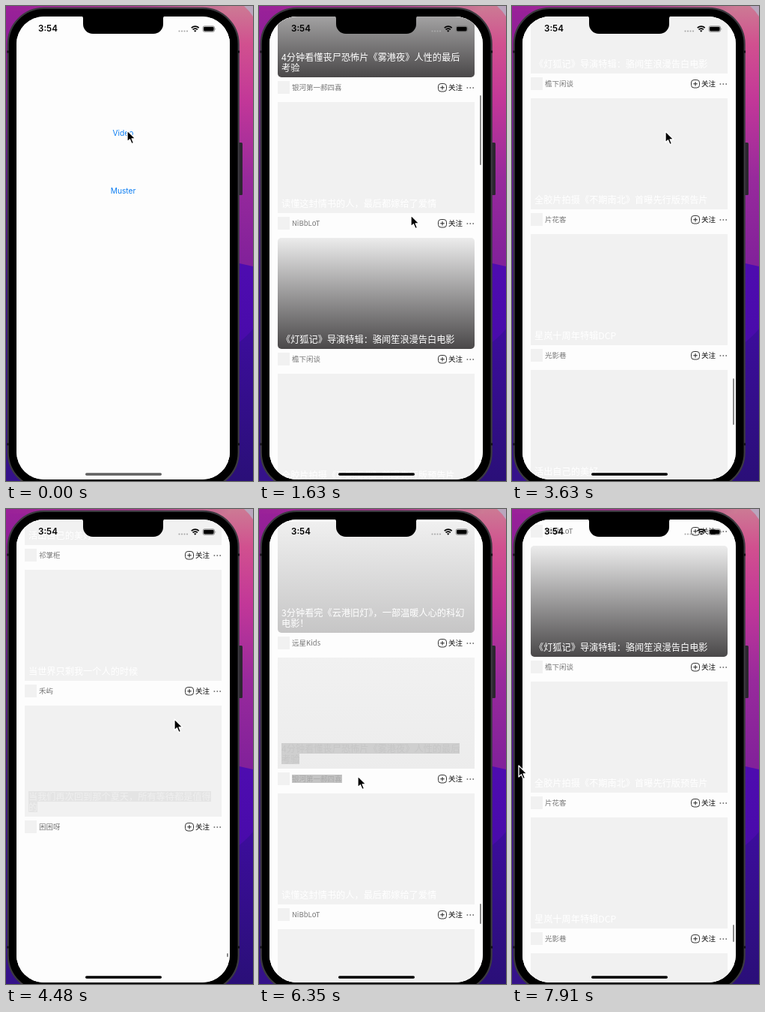
An HTML page for the animation above (8 s loop, 330 by 633 pixels).

```html
<!DOCTYPE html>
<html lang="zh">
<head>
<meta charset="utf-8">
<title>Video list</title>
<style>
html, body { margin: 0; width: 330px; height: 633px; overflow: hidden; background: #35107f; }
body { position: relative; }
svg { position: absolute; left: 0; top: 0; }
#screen { position: absolute; left: 14px; top: 14px; width: 285px; height: 617px; border-radius: 37px; overflow: hidden; background: #fdfdfd; }
.page { position: absolute; left: -14px; top: -14px; width: 330px; height: 633px; background: #fdfdfd; }
.link { position: absolute; left: 14px; width: 285px; text-align: center; font: 10.2px/14px Inter, sans-serif; color: #0a7cf2; }
.item { position: absolute; left: 25px; top: 0; width: 263px; height: 181px; font-family: "Noto Sans CJK SC", "Noto Sans CJK", sans-serif; }
.cover { position: absolute; left: 0; top: 0; width: 263px; height: 148px; background: #f1f1f1; overflow: hidden; }
.shade { position: absolute; inset: 0; background: linear-gradient(#ececec, #4a4849); }
.title { position: absolute; left: 5px; bottom: 6px; font-size: 12.2px; line-height: 14px; color: #fff; white-space: pre; }
.title span { display: block; width: fit-content; height: 14px; }
.avatar { position: absolute; left: 0; top: 153px; width: 16px; height: 17px; background: #f1f1f1; }
.author { position: absolute; left: 19px; top: 156px; height: 11px; font-size: 9.5px; line-height: 11px; color: #777; white-space: pre; }
.follow { position: absolute; left: 228px; top: 156px; font-size: 9.5px; line-height: 11px; color: #111; }
.item svg { left: 213px; top: 154px; }
.loaded .cover { border-radius: 5px; }
.faint .title span { background: #e4e4e4; color: #efefef; }
.pulse .title span { background: #cfcfcf; color: #c6c6c6; }
.pulse .author { background: #c4c4c4; color: #a9a9a9; }
#bar { position: absolute; left: 295px; top: 0; width: 2px; border-radius: 1px; background: #8a8a8a; }
#time { position: absolute; left: 43px; top: 23px; font: 600 11.6px/15px Inter, sans-serif; color: #000; }
</style>
</head>
<body>
<svg width="330" height="633">
  <defs>
    <linearGradient id="right" x2="0" y2="1">
      <stop offset="0" stop-color="#cc7a94"/><stop offset=".08" stop-color="#d1508f"/>
      <stop offset=".2" stop-color="#c23798"/><stop offset=".36" stop-color="#982a9c"/>
      <stop offset=".54" stop-color="#82219a"/>
    </linearGradient>
    <linearGradient id="left" x2="0" y2="1">
      <stop offset="0" stop-color="#9a2199"/><stop offset=".3" stop-color="#6a1a8e"/>
      <stop offset=".6" stop-color="#40108a"/><stop offset="1" stop-color="#35128a"/>
    </linearGradient>
    <linearGradient id="top"><stop offset="0" stop-color="#9a2199"/><stop offset=".6" stop-color="#a93a8c"/><stop offset="1" stop-color="#cc7a94"/></linearGradient>
    <linearGradient id="deep" x2="0" y2="1"><stop offset="0" stop-color="#4e0cb0"/><stop offset="1" stop-color="#4009a2"/></linearGradient>
    <linearGradient id="night" x2="0" y2="1"><stop offset="0" stop-color="#3c0d9c"/><stop offset="1" stop-color="#2a0f78"/></linearGradient>
  </defs>
  <rect width="160" height="633" fill="url(#left)"/>
  <rect x="160" width="170" height="633" fill="url(#right)"/>
  <rect width="300" height="6" fill="url(#top)"/>
  <path d="M318 0H330V14Q325 6 318 0Z" fill="#b9a6bd"/>
  <path d="M160 335L312 343L330 347V633H160Z" fill="url(#deep)"/>
  <path d="M160 520Q300 470 330 430V633H160Z" fill="url(#night)"/>
  <rect x="310" y="182" width="6" height="70" rx="1.5" fill="#2c2630"/>
  <rect x="2.7" y="2.9" width="308" height="640" rx="48" stroke="#3c3a40" stroke-width="2.2"/>
  <path d="M1.4 61h2.4M309.7 61h2.4M1.4 584h2.4M309.7 584h2.4" stroke="#121114" stroke-width="3"/>
</svg>

<div id="screen">
  <div class="page" id="home">
    <div class="link" style="top:162px">Video</div>
    <div class="link" style="top:239px">Muster</div>
  </div>
  <div class="page" id="list"><div id="bar"></div></div>
</div>

<div id="time">3:54</div>
<svg width="330" height="633">
  <path d="M100 13.5A3 3 0 0 1 103 16.5V24A13 13 0 0 0 116 37H197A13 13 0 0 0 210 24V16.5A3 3 0 0 1 213 13.5Z"/>
  <path d="M231.5 33.5h.01M235 33.5h.01M238.5 33.5h.01M242 33.5h.01" stroke="#aaa" stroke-width="2.2" stroke-linecap="round"/>
  <path d="M247.7 29.2Q252.7 25 257.7 29.2M249.5 31.4Q252.7 28.8 255.9 31.4" fill="none" stroke="#000" stroke-width="1.7"/>
  <path d="M250.9 32.8Q252.7 31.6 254.5 32.8L252.7 34.8Z"/>
  <rect x="263" y="26.8" width="15.6" height="7.6" rx="2.2" fill="none" stroke="#777" stroke-width=".8"/>
  <rect x="264" y="27.8" width="13.6" height="5.6" rx="1.4"/>
  <path d="M279.6 29.2Q281 30.6 279.6 32Z" fill="#777"/>
  <rect id="handle" x="106" y="622.3" width="102" height="3.4" rx="1.7"/>
  <path id="cursor" d="M0 0V15L3.4 11.8L5.9 17.6L8.5 16.5L6.1 10.8H10.8Z" stroke="#fff" stroke-width="1.3" stroke-linejoin="round"/>
</svg>

<script>
const LOOP = 8000, STEP = 130, PITCH = 181, PAGE = 10, TOP = 44, VIEW = 617;
const PUSHED = 630, RELOAD = 6260, FADE = 350, STAGGER = 80;
const $ = id => document.getElementById(id);
const clamp = v => Math.max(0, Math.min(1, v));

// one page of the feed: [title, author]
const feed = [
  ['一个人也要好好吃饭的理由', '温一盏'],
  ['3分钟看完《云港旧灯》，一部温暖人心的科幻\n电影！', '远星Kids'],
  ['4分钟看懂丧尸恐怖片《雾港夜》人性的最后\n考验', '银河第一郝四喜'],
  ['读懂这封情书的人，最后都嫁给了爱情', 'NiBbLoT'],
  ['《灯狐记》导演特辑：骆闻笙浪漫告白电影', '檐下闲谈'],
  ['全胶片拍摄《不期南北》首曝先行版预告片', '片花客'],
  ['星岚十周年特辑DCP', '光影巷'],
  ['活出自己的美好', '祁掌柜'],
  ['当世界只剩我一个人的时候', '禾屿'],
  ['当我们再次回到那个夏天，所有等待都是值得\n的', '困困呀']
];
const withCover = [1, 2, 4];

// spans in which the picture moves; it rests in between
const bursts = [
  [120, PUSHED], [920, 1630], [2000, 2580], [2930, 3720], [4040, 4480],
  [4840, 5580], [5910, 5910], [RELOAD, 6350], [6560, 6900], [7200, 7910]
];

// key poses: time, scroll offset, cursor
const keys = [
  { t: 920, offset: 0, x: 162, y: 166 },
  { t: 1630, offset: 459, x: 203, y: 279 },
  { t: 2930, offset: 2677, x: 191, y: 83 },
  { t: 4480, offset: 6841, x: 225, y: 280 },
  { t: 6350, offset: 11068, x: 132, y: 356 },
  { t: 6900, offset: 11355, x: 144, y: 338 },
  { t: 7910, offset: 13389, x: 9, y: 342 }
];

// the picture refreshes about every STEP ms within a burst
function hold(t) {
  let last = 0;
  for (const [a, b] of bursts) {
    if (t < a) break;
    const step = (b - a) / Math.max(1, Math.round((b - a) / STEP));
    last = t < b ? a + Math.floor((t - a) / step) * step : b;
  }
  return last;
}

function pose(t) {
  const next = keys.findIndex(k => k.t > t);
  const b = next < 0 ? keys[keys.length - 1] : keys[next], a = keys[next - 1] || b;
  const p = a === b ? 0 : (t - a.t) / (b.t - a.t);
  const mix = name => Math.round(a[name] + (b[name] - a[name]) * p);
  const offset = mix('offset');
  const pages = Math.max(2, Math.floor(t / 900), Math.round((offset + 1200) / (PAGE * PITCH)));
  return { offset, pages, x: mix('x'), y: mix('y') };
}

const slots = Array.from({ length: 6 }, () => {
  const el = document.createElement('div'), part = name => el.querySelector('.' + name);
  el.innerHTML = `<div class="cover"><div class="shade"></div><div class="title"></div></div>
    <div class="avatar"></div><div class="author"></div><div class="follow">关注</div>
    <svg width="52" height="16"><rect x="1.5" y="2.5" width="11" height="10.5" rx="3.6" fill="none" stroke="#333"/>
    <path d="M4.3 7.75h5.4M7 5v5.5" stroke="#222"/>
    <path d="M40.4 8h.01M44.3 8h.01M48.2 8h.01" stroke="#777" stroke-width="1.9" stroke-linecap="round"/></svg>`;
  $('list').insertBefore(el, $('bar'));
  return { el, shade: part('shade'), title: part('title'), author: part('author') };
});

// the first page is ready at once; later covers fade in one after another
function coverAlpha(i, t) {
  if (!withCover.includes(i % PAGE)) return 0;
  if (i < PAGE) return 1;
  const due = RELOAD + Math.max(0, i - 6 * PAGE - 1) * STAGGER;
  return clamp((t - due) / FADE);
}

function fill(slot, i, t, s) {
  const on = i >= 0 && i < s.pages * PAGE;
  slot.el.style.display = on ? '' : 'none';
  if (!on) return;
  const [title, author] = feed[i % PAGE], lines = title.split('\n'), alpha = coverAlpha(i, t);
  const state = alpha > .1 ? 'loaded' : alpha > 0 ? 'pulse' : lines.length > 1 ? 'faint' : '';
  slot.el.className = 'item ' + state;
  slot.el.style.transform = `translateY(${TOP + i * PITCH - s.offset}px)`;
  slot.shade.style.opacity = alpha;
  slot.title.innerHTML = lines.map(line => `<span>${line}</span>`).join('');
  slot.author.textContent = author;
}

function scrollBar(s, t) {
  const total = s.pages * PAGE * PITCH, track = 545;
  const over = Math.max(0, s.offset + VIEW - total);
  const h = Math.max(5, track * VIEW / total - over);
  const y = over ? 597 - h : 50 + track * s.offset / total;
  $('bar').style.cssText = `height:${h}px;transform:translateY(${y}px);opacity:${s.offset ? 1 : 0}`;
}

let shown = -1;
function draw(t) {
  if (t === shown) return;
  shown = t;
  const s = pose(t), push = 1 - (1 - clamp(t / PUSHED)) ** 3;
  $('home').style.transform = `translateX(${-90 * push}px)`;
  $('list').style.transform = `translateX(${290 * (1 - push)}px)`;
  $('handle').setAttribute('fill', push ? '#000' : '#606060');
  $('cursor').setAttribute('transform', `translate(${s.x} ${s.y})`);
  const first = Math.floor((s.offset - TOP) / PITCH);
  slots.forEach((slot, k) => fill(slot, first + k, t, s));
  scrollBar(s, t);
}

const start = performance.now();
function tick() {
  draw(hold((performance.now() - start) % LOOP));
  requestAnimationFrame(tick);
}
tick();
</script>
</body>
</html>
```
